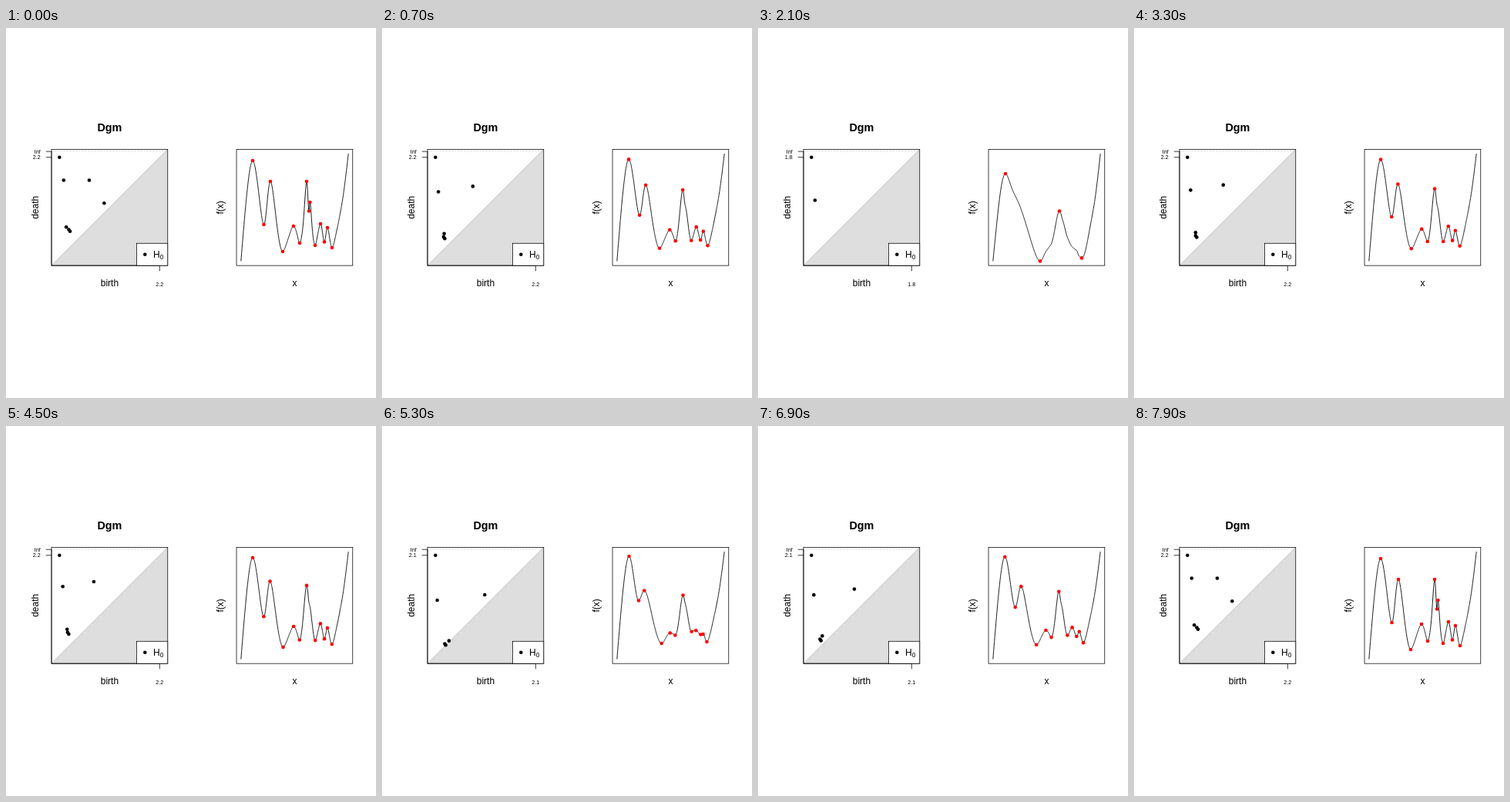
These frames come from a looping animation (480x480 px, 8 s). An HTML page with a canvas:

```html
<!DOCTYPE html>
<html lang="en">
<head>
<meta charset="utf-8">
<title>Persistence diagram</title>
<style>
html, body { margin: 0; width: 100%; height: 100%; overflow: hidden; background: #fff; }
canvas { display: block; width: 480px; height: 480px; }
</style>
</head>
<body>
<canvas id="stage" width="480" height="480"></canvas>
<script>
const ctx = document.getElementById('stage').getContext('2d');
const FONT = '"Liberation Sans", Arial, sans-serif';
const STEP_MS = 100, LEVELS = 20;
const SIDE = 150.72, TOP = 157.44, LEFT = 59.04, RIGHT = 299.04, BOTTOM = TOP + SIDE;
const FLOOR = 302.4;

// drift acts while the wiggles die out, sink afterwards; dx is the sideways move.
// A feature with a gap is a pair of turning points that meet at level `life`.
const features = [
  { x: 320, y: 172, dx: 1, drift: -3, sink: 20 },
  { x: 338.75, y: 227, dx: -4, drift: -7, sink: 0, gap: 8.5, rise: 56, life: 15.5 },
  { x: 359, y: 290, dx: 7, drift: -8, sink: 20.4 },
  { x: 377, y: 268, dx: 0, drift: 2, sink: 15, gap: 8, rise: -22, life: 14.3 },
  { x: 390, y: 199, dx: 1, drift: 20.5, sink: 18 },
  { x: 393.7, y: 231.7, dx: 0, drift: 0, sink: 12, gap: 1.4, rise: 11.5, life: 4 },
  { x: 404.5, y: 268, dx: 0, drift: -2, sink: 12, gap: 7, rise: 28, life: 13.5 },
  { x: 415, y: 268.3, dx: 0, drift: 2, sink: 22, gap: 4, rise: 18.5, life: 13.2 },
  { x: 423, y: 285, dx: -3, drift: -5, sink: 18.4 },
  { x: 434, y: 238, dx: 0, drift: -6, sink: 9 }
];

function knotsAt(level) {
  const move = (level / 18) ** 2;
  const early = Math.min(level / 13, 1), late = Math.max(0, (level - 13) / 5);
  const knots = [{ x: 304.8, y: FLOOR }];
  for (const f of features) {
    const x = f.x + f.dx * move;
    const y = Math.min(FLOOR, f.y + f.drift * early + f.sink * late);
    if (!f.gap) {
      knots.push({ x, y });
      continue;
    }
    const amp = Math.max(-0.4, 1 - (level / f.life) ** 1.5);
    const half = f.gap / 2 * (0.8 + 0.2 * Math.max(0, amp));
    const swing = f.rise / 2 * amp;
    knots.push({ x: x - half, y: y + swing }, { x: x + half, y: y - swing });
  }
  knots.push({ x: 444.2, y: 163 });
  return knots;
}

// Monotone slopes, then quintic pieces that share the curvature at each knot.
function curveThrough(knots) {
  const n = knots.length - 1, h = [], d = [], m = [], c = [];
  for (let i = 0; i < n; i++) {
    h[i] = knots[i + 1].x - knots[i].x;
    d[i] = (knots[i + 1].y - knots[i].y) / h[i];
  }
  m[0] = 1.4 * d[0];
  m[n] = 1.2 * d[n - 1];
  for (let i = 1; i < n; i++) {
    const w1 = 2 * h[i] + h[i - 1], w2 = h[i] + 2 * h[i - 1];
    m[i] = d[i - 1] * d[i] <= 0 ? 0 : (w1 + w2) / (w1 / d[i - 1] + w2 / d[i]);
  }
  const after = i => (6 * d[i] - 4 * m[i] - 2 * m[i + 1]) / h[i];
  const before = i => (4 * m[i] + 2 * m[i - 1] - 6 * d[i - 1]) / h[i - 1];
  for (let i = 1; i < n; i++) c[i] = (after(i) + before(i)) / 2;
  c[0] = after(0);
  c[n] = before(n);

  return x => {
    let i = 0;
    while (i < n - 1 && x > knots[i + 1].x) i++;
    const s = (x - knots[i].x) / h[i], r = 1 - s;
    const side = (y, slope, bend, u, v) =>
      v ** 3 * (y * (1 + 3 * u + 6 * u * u) + slope * u * (1 + 3 * u) + bend * u * u / 2);
    return side(knots[i].y, m[i] * h[i], c[i] * h[i] ** 2, s, r)
      + side(knots[i + 1].y, -m[i + 1] * h[i], c[i + 1] * h[i] ** 2, r, s);
  };
}

function extremaOf(knots) {
  return knots.filter((p, i) => {
    if (!i || i === knots.length - 1) return false;
    const l = knots[i - 1].y - p.y, r = knots[i + 1].y - p.y;
    p.valley = l < 0;
    return l * r > 0;
  });
}

// Highest point passed before reaching a deeper valley.
function barrier(ext, i, dir) {
  let top = Infinity;
  for (let j = i + dir; ext[j]; j += dir) {
    if (ext[j].valley && ext[j].y > ext[i].y) return top;
    if (!ext[j].valley) top = Math.min(top, ext[j].y);
  }
  return dir < 0 ? top : -Infinity;
}

function pairsOf(ext) {
  const pairs = [];
  ext.forEach((p, i) => {
    if (p.valley) pairs.push([p.y, Math.max(barrier(ext, i, -1), barrier(ext, i, 1))]);
  });
  return pairs;
}

function line(color, width, ...pts) {
  ctx.strokeStyle = color;
  ctx.lineWidth = width;
  ctx.beginPath();
  pts.forEach(([x, y]) => ctx.lineTo(x, y));
  ctx.stroke();
}

function frame(x, y, w, h) {
  ctx.strokeStyle = '#000';
  ctx.lineWidth = 0.75;
  ctx.strokeRect(x, y, w, h);
}

function dot(x, y, color) {
  ctx.fillStyle = color;
  ctx.beginPath();
  ctx.arc(x, y, 2.3, 0, Math.PI * 2);
  ctx.fill();
}

function text(str, x, y, size = 12, align = 'center', weight = '') {
  ctx.font = `${weight} ${size}px ${FONT}`;
  ctx.textAlign = align;
  ctx.fillStyle = '#000';
  ctx.fillText(str, x, y);
}

function upright(str, x, y) {
  ctx.save();
  ctx.translate(x, y);
  ctx.rotate(-Math.PI / 2);
  text(str, 0, 0);
  ctx.restore();
}

function drawDiagram(ext, level) {
  const end = LEFT + SIDE;
  ctx.fillStyle = '#dedede';
  ctx.beginPath();
  ctx.moveTo(LEFT, BOTTOM);
  ctx.lineTo(end, TOP);
  ctx.lineTo(end, BOTTOM);
  ctx.fill();
  line('#bebebe', 0.9, [LEFT, BOTTOM], [end, TOP]);
  ctx.setLineDash([1, 3]);
  line('#c4c4c4', 0.9, [LEFT, 160.2], [end, 160.2]);
  ctx.setLineDash([]);

  frame(LEFT, TOP, SIDE, SIDE);
  line('#000', 0.75, [LEFT - 7.2, 160.2], [LEFT, 160.2], [LEFT, BOTTOM]);
  line('#000', 0.75, [LEFT - 7.2, 167.7], [LEFT, 167.7]);
  line('#000', 0.75, [LEFT, BOTTOM], [199.4, BOTTOM], [199.4, BOTTOM + 7.2]);

  const label = (2.17 - 0.46 * (level / 19) ** 4).toFixed(1);
  text('Inf', 44.8, 162.8, 7.2, 'right');
  text(label, 44.8, 170.4, 7.2, 'right');
  text(label, 199.3, 334.6, 7.2);
  text('Dgm', 134.4, 134, 14.4, 'center', 'bold');
  text('birth', 134.4, 335);
  upright('death', 42, 232.8);

  const low = Math.max(...ext.map(p => p.y)), high = Math.min(...ext.map(p => p.y));
  const scale = y => 10.2 + 130.2 * (low - y) / (low - high);
  for (const [birth, death] of pairsOf(ext)) {
    dot(LEFT + 0.1 + scale(birth), BOTTOM - scale(death), '#000');
  }

  ctx.fillStyle = '#fff';
  ctx.fillRect(169.4, 279.3, end - 169.4, BOTTOM - 279.3);
  frame(169.4, 279.3, end - 169.4, BOTTOM - 279.3);
  dot(180.3, 293.8, '#000');
  text('H', 191, 297.5, 12, 'left');
  text('0', 199.7, 300, 8.4, 'left');
}

function drawCurve(knots, ext) {
  frame(RIGHT, TOP, SIDE, SIDE);
  text('x', 374.4, 335);
  upright('f(x)', 282, 232.8);
  const f = curveThrough(knots), pts = [];
  for (let x = 304.8; x < 444.2; x += 0.2) pts.push([x, f(x)]);
  line('#000', 0.9, ...pts);
  ext.forEach(p => dot(p.x, p.y, '#f00'));
}

function draw(ms) {
  const step = Math.floor(ms / STEP_MS) % (2 * LEVELS);
  const level = step < LEVELS ? step : 2 * LEVELS - 1 - step;
  const knots = knotsAt(Math.min(level, 18.5)), ext = extremaOf(knots);
  ctx.fillStyle = '#fff';
  ctx.fillRect(0, 0, 480, 480);
  drawDiagram(ext, level);
  drawCurve(knots, ext);
}

const start = performance.now();
function tick() {
  draw(performance.now() - start);
  requestAnimationFrame(tick);
}
tick();
</script>
</body>
</html>
```
